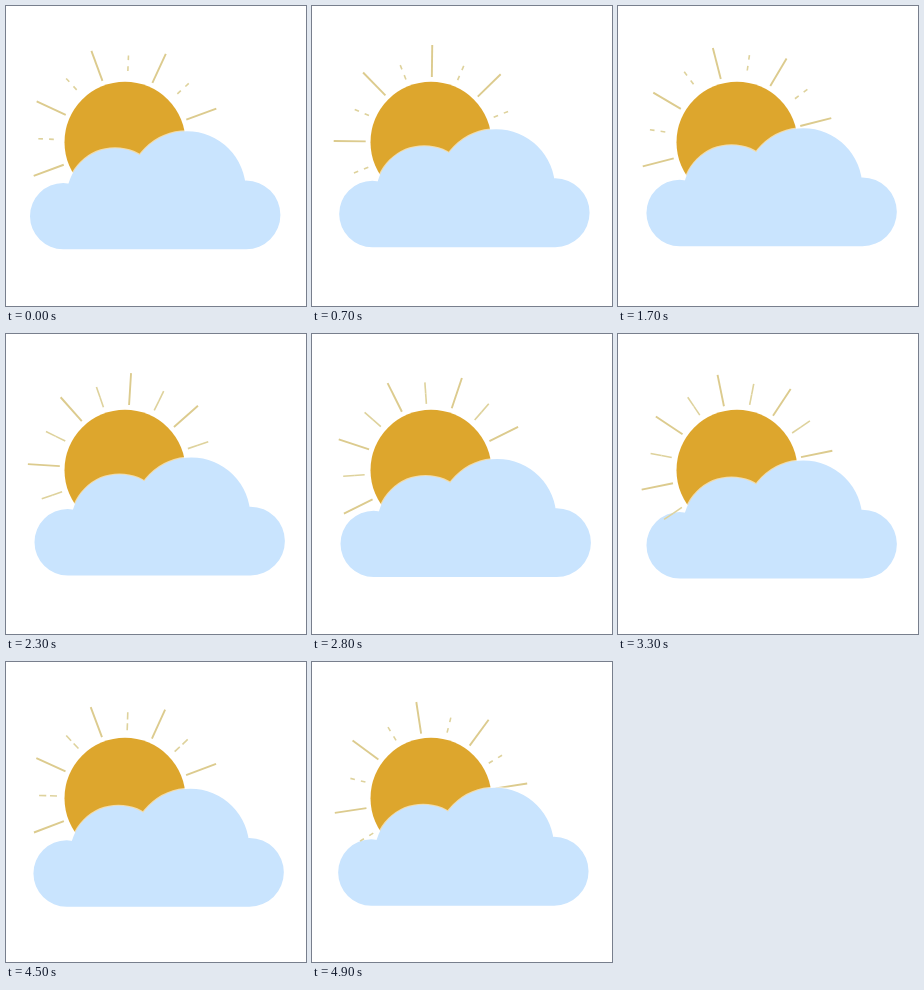
Recreate the animation shown at these times as an HTML page with a canvas. Size 300x300 px, loop 5 s.

```html
<!DOCTYPE html>
<html lang="en">
<head>
<meta charset="utf-8">
<title>Sun and cloud</title>
<style>
  html, body { margin: 0; width: 100%; height: 100%; overflow: hidden; background: #fff; }
  canvas { display: block; width: 100vw; height: 100vh; }
</style>
</head>
<body>
<canvas id="stage"></canvas>
<script>
const canvas = document.getElementById('stage');
const ctx = canvas.getContext('2d');
const SIZE = 300, LOOP = 5000, STEP = 100, TAU = Math.PI * 2;
const SUN = { x: 119, y: 136.2, r: 60.5 };

const mix = (a, b, p) => a + (b - a) * p;
const clamp = v => Math.min(1, Math.max(0, v));

function cloudPath() {
  const path = new Path2D();
  const puff = (x, y, r) => {
    path.moveTo(x + r, y);
    path.arc(x, y, r, 0, TAU);
  };
  puff(57.2, 209.8, 33.2);
  puff(109, 190.3, 48.3);
  puff(181, 183.8, 58.8);
  puff(240, 208.6, 34.4);
  path.rect(57, 185, 183, 58);
  return path;
}
const CLOUD = cloudPath();

function ray(deg, from, to, width, color) {
  if (to - from < 0.1) return;
  const a = deg * Math.PI / 180, s = Math.sin(a), c = -Math.cos(a);
  ctx.lineWidth = width;
  ctx.strokeStyle = color;
  ctx.beginPath();
  ctx.moveTo(SUN.x + s * from, SUN.y + c * from);
  ctx.lineTo(SUN.x + s * to, SUN.y + c * to);
  ctx.stroke();
}

// Short rays: two sliding dashes that merge into one line mid-loop
function dashes(t) {
  const open = clamp(0.5 + 1.6 * Math.cos(TAU * (t - 0.7) / 5));
  const slide = 3.5 - 2.5 * Math.cos(TAU * (t - 0.7) / 2.1);
  const inner = 66.5 + slide;
  return [
    [mix(66.5, inner, open), mix(77, inner + 4.7, open)],
    [mix(77, inner + 10.9, open), mix(88, inner + 15.5, open)]
  ];
}

function rays(t, min, max) {
  const turn = 24.8 + 29.9 * t;
  const parts = dashes(t);
  for (let i = 0; i < 16; i++) {
    const deg = (turn + i * 22.5 + 180) % 360 - 180;
    if (deg <= min || deg > max) continue;
    if (i % 2) parts.forEach(([from, to]) => ray(deg, from, to, 1.6, '#ded29c'));
    else ray(deg, 65.3, 97.3, 1.9, '#dccb8e');
  }
}

function cloud(t) {
  const dx = 4.5 * (1 - ((t - 2.65) / 2.65) ** 4);
  const dy = -0.3 - 2.6 * Math.sin(TAU * (t - 0.2) / 5);
  ctx.save();
  ctx.translate(dx, dy);
  ctx.lineWidth = 2;
  ctx.strokeStyle = 'rgba(255, 255, 255, 0.6)';
  ctx.stroke(CLOUD);
  ctx.fillStyle = '#c9e4fe';
  ctx.fill(CLOUD);
  ctx.restore();
}

function draw(t) {
  const w = Math.round(innerWidth * devicePixelRatio);
  const h = Math.round(innerHeight * devicePixelRatio);
  if (canvas.width !== w || canvas.height !== h) {
    canvas.width = w;
    canvas.height = h;
  }
  ctx.setTransform(w / SIZE, 0, 0, h / SIZE, 0, 0);
  ctx.fillStyle = '#fff';
  ctx.fillRect(0, 0, SIZE, SIZE);
  ctx.fillStyle = '#dda62d';
  ctx.beginPath();
  ctx.arc(SUN.x, SUN.y, SUN.r, 0, TAU);
  ctx.fill();
  rays(t, -100, 100);
  cloud(t);
  // Rays stay in front of the cloud until they set on the left
  rays(t, -125, -100);
}

const start = performance.now();
function tick() {
  const ms = (performance.now() - start) % LOOP;
  draw(Math.floor(ms / STEP) * STEP / 1000);
  requestAnimationFrame(tick);
}
tick();
</script>
</body>
</html>
```
